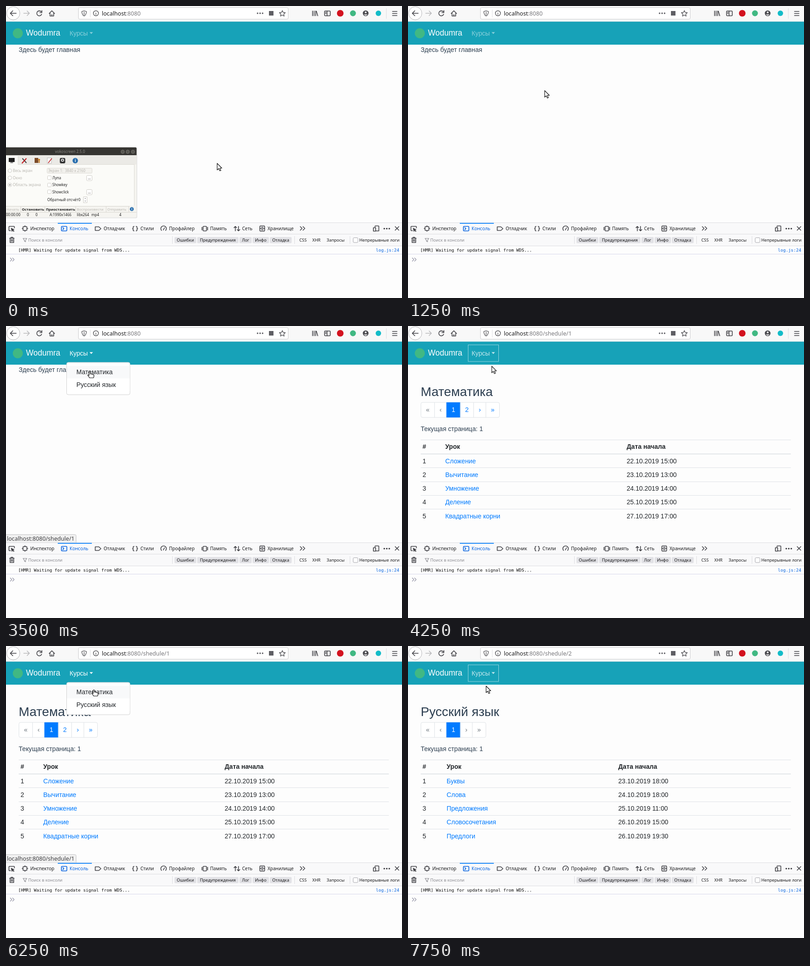
These frames come from a looping animation (872 px wide and 642 px high, 8 s). An HTML page:

```html
<!DOCTYPE html>
<html lang="ru">
<head>
<meta charset="utf-8">
<title>Курсы</title>
<style>
html, body { margin: 0; width: 100%; height: 100%; overflow: hidden; background: #fdfdfd; }
svg { display: block; }
text { white-space: pre; }
.ui { font-family: "Noto Sans", "Open Sans", sans-serif; }
.page { font: 14.16px "Liberation Sans", Arial, sans-serif; fill: #212529; }
.mono { font: 9.5px "DejaVu Sans Mono", monospace; }
.line { fill: none; stroke: #3f3f44; stroke-width: 1.6; stroke-linecap: round; stroke-linejoin: round; }
.thin { stroke-width: 1.2; }
.solid { fill: #3f3f44; stroke: none; }
.rule { stroke: #dcdce0; }
.mid { text-anchor: middle; }
.b { font-weight: bold; }
.dim { fill: #b9b7b1; }
.slate { fill: #2c3e50; }

/* 250 ms = 3.125% */
.t { animation: 8s step-end infinite; }
#recorder { animation-name: recorder; }
#home { animation-name: home; }
#math { animation-name: math; }
#rus { animation-name: rus; }
#menu { animation-name: menu; }
#row1 { animation-name: row1; }
#row2 { animation-name: row2; }
#label2 { animation-name: label2; }
#link { animation-name: link; }
#focus { animation-name: focus; }
#stRoot { animation-name: stRoot; }
#stOne { animation-name: stOne; }
#stTwo { animation-name: stTwo; }
#hand { animation-name: hand; }
#arrow { animation-name: arrow; }
#cursor { animation-name: move; }

@keyframes recorder { 0% { visibility: visible } 3.125%, to { visibility: hidden } }
@keyframes home { 0% { visibility: visible } 46.875%, to { visibility: hidden } }
@keyframes math { 0%, 87.5%, to { visibility: hidden } 46.875% { visibility: visible } }
@keyframes rus { 0% { visibility: hidden } 87.5%, to { visibility: visible } }
@keyframes menu { 0%, 46.875%, 87.5%, to { visibility: hidden } 28.125%, 71.875% { visibility: visible } }
@keyframes row1 { 0%, 46.875%, 81.25%, to { fill: #fff } 40.625%, 78.125% { fill: #f8f9fa } }
@keyframes row2 { 0%, 87.5%, to { fill: #fff } 81.25% { fill: #f8f9fa } 84.375% { fill: #007bff } }
@keyframes label2 { 0%, 87.5%, to { fill: #212529 } 84.375% { fill: #fff } }
@keyframes link {
  0% { fill-opacity: .5 }
  25%, 46.875%, 87.5%, to { fill-opacity: .75 }
  28.125%, 71.875% { fill-opacity: 1 }
}
@keyframes focus { 0%, 71.875% { visibility: hidden } 46.875%, 87.5%, to { visibility: visible } }
@keyframes stRoot { 0%, 40.625%, 78.125%, to { visibility: hidden } 28.125%, 71.875% { visibility: visible } }
@keyframes stOne { 0%, 46.875%, 81.25%, to { visibility: hidden } 40.625%, 78.125% { visibility: visible } }
@keyframes stTwo { 0%, 87.5%, to { visibility: hidden } 81.25% { visibility: visible } }
@keyframes hand { 0%, 46.875%, 87.5%, to { visibility: hidden } 25%, 62.5% { visibility: visible } }
@keyframes arrow { 0%, 46.875%, 87.5%, to { visibility: visible } 25%, 62.5% { visibility: hidden } }
@keyframes move {
  0% { transform: translate(465px, 346px); animation-timing-function: steps(5) }
  15.625% { transform: translate(301px, 186px); animation-timing-function: steps(3) }
  25%, 31.25% { transform: translate(161px, 64px); animation-timing-function: steps(4) }
  43.75%, 46.875% { transform: translate(185px, 100px); animation-timing-function: steps(7) }
  68.75%, 71.875% { transform: translate(183px, 59px); animation-timing-function: steps(4) }
  84.375% { transform: translate(205px, 133px); animation-timing-function: steps(4) }
  96.875%, to { transform: translate(172px, 88px) }
}
</style>
</head>
<body>
<svg width="872" height="642" viewBox="0 0 872 642">
  <rect width="872" height="642" fill="#fdfdfd"/>

  <!-- browser toolbar -->
  <g class="ui" font-size="12.6">
    <rect width="872" height="35" fill="#f8f8f8"/>
    <path class="rule" d="M0 34.5H872M837.5 5V28"/>
    <circle cx="16" cy="16" r="14.5" fill="#fff" stroke="#b4b4b6"/>
    <g class="line">
      <path d="M22.5 16H10M15 10.5L9.5 16L15 21.5"/>
      <path d="M39 16H51M46.5 11L51.5 16L46.5 21" stroke="#b9b9bb"/>
      <path d="M77.5 12.5A5.5 5.5 0 1 0 78.5 18M79 10V14.5H74.5"/>
      <path d="M95 16.5L101 10.5L107 16.5M97 16V22H105V16M101 22V18.5"/>
    </g>
    <rect x="159.5" y="3.5" width="462" height="25.5" rx="3" fill="#fff" stroke="#ccccce"/>
    <g class="line thin" stroke="#5f5f64">
      <path d="M172 10.5L177 12C177 17 175.5 20 172 22C168.5 20 167 17 167 12ZM172 13V19"/>
      <circle cx="198" cy="16" r="5.6"/>
      <path d="M198 15.5V19M198 13V13.1"/>
      <path d="M608.5 10L610.4 14.2L615 14.7L611.6 17.8L612.6 22.3L608.5 20L604.4 22.3L605.4 17.8L602 14.7L606.6 14.2Z"/>
    </g>
    <path class="rule" d="M185.5 8V25"/>
    <g fill="#5f5f64">
      <circle cx="554" cy="16" r="1.7"/><circle cx="559.5" cy="16" r="1.7"/><circle cx="565" cy="16" r="1.7"/>
      <rect x="579" y="11" width="10" height="10"/>
    </g>
    <text x="211" y="21" fill="#18181a">localhost<tspan fill="#77777b">:8080</tspan></text>
    <g class="line">
      <path d="M675 11V21.5M678.5 11V21.5M682 11V21.5M683.5 11.5L686.5 21.5"/>
      <rect x="701.5" y="11" width="12.5" height="10.5" rx="1.5"/>
      <path d="M707 11V21.5M703.5 14H705M703.5 16.5H705"/>
      <path d="M851 12H861M851 16.5H861M851 21H861"/>
    </g>
    <circle cx="736" cy="16" r="7.3" fill="#d3121f"/>
    <circle cx="764" cy="16" r="6.5" fill="#41b883"/>
    <circle cx="792" cy="16" r="6.3" fill="#4a4a4f"/>
    <circle cx="792" cy="14" r="2" fill="#f8f8f8"/><path d="M788 18.5H796Q794 21 792 21T788 18.5" fill="#f8f8f8"/>
    <circle cx="820" cy="16" r="6" fill="#12bcc8"/>
  </g>

  <!-- page -->
  <g class="page">
    <g id="home" class="t"><text class="slate" x="28" y="100.5">Здесь будет главная</text></g>
    <g id="math" class="t"></g>
    <g id="rus" class="t"></g>

    <rect y="34.4" width="872" height="50.6" fill="#17a2b8"/>
    <circle cx="26" cy="60" r="11" fill="#41b883"/>
    <text x="44" y="65.3" font-size="17.53" fill="#fff">Wodumra</text>
    <g id="link" class="t" fill="#fff"><text x="140" y="65">Курсы</text><path d="M184 57.5H191.5L187.75 61.5Z"/></g>
    <rect id="focus" class="t" x="132.5" y="41.5" width="67" height="36.5" fill="none" stroke="#fff" stroke-opacity=".55"/>

    <g id="menu" class="t">
      <rect x="133.5" y="80" width="139.5" height="71" rx="3.5" fill="#fff" stroke="#d2d2d2"/>
      <rect id="row1" class="t" x="134" y="87.5" width="138.5" height="27.8" fill="#fff"/>
      <rect id="row2" class="t" x="134" y="115.3" width="138.5" height="28" fill="#fff"/>
      <text x="155" y="106">Математика</text>
      <text id="label2" class="t" x="155" y="134">Русский язык</text>
    </g>
  </g>

  <!-- screen recorder -->
  <g id="recorder" class="t ui" font-size="8" fill="#1f1f1f">
    <rect x="-4" y="311" width="293" height="155.5" rx="3" fill="#000" opacity=".1"/>
    <rect x="-4" y="311" width="291.5" height="154" rx="3" fill="#f5f4f0"/>
    <path d="M0 310.7H285Q287.5 310.7 287.5 313.5V328H0Z" fill="#363532"/>
    <text class="mid" x="141" y="323" font-size="8.4" fill="#8d8b85">vokoscreen 2.5.0</text>
    <g fill="#55544f" stroke="#77756f"><circle cx="257" cy="320.5" r="3.8"/><circle cx="268" cy="320.5" r="3.8"/><circle cx="279.5" cy="320.5" r="3.8"/></g>
    <rect y="328" width="287.5" height="20.5" fill="#ebeae6"/>
    <path d="M0 330H26V349H282V439H0Z" fill="#fbfbf8"/>
    <path d="M26.5 330V348.5H282.5V439" fill="none" stroke="#dddbd5"/>
    <rect x="6" y="334" width="13" height="9" fill="#1d1d1d"/><rect x="9.5" y="343" width="6" height="2.5" fill="#888"/>
    <path d="M36 335L45 345" stroke="#444" stroke-width="2"/><path d="M45 335L35 346" stroke="#c4161c" stroke-width="2"/>
    <rect x="63" y="334" width="8" height="11" fill="#7b4b28"/><path d="M73 336V345M70 338H75" stroke="#c77f28" stroke-width="2.5"/>
    <rect x="91" y="334" width="9" height="12" fill="#fff" stroke="#bbb"/><path d="M101 335L93 345" stroke="#c23a3a" stroke-width="2"/>
    <rect x="118.5" y="334" width="12" height="12" rx="3" fill="#333"/><circle cx="124.5" cy="339" r="3.3" fill="#eee"/><circle cx="124.5" cy="339" r="1.5" fill="#222"/>
    <circle cx="152.5" cy="340" r="6" fill="#2a6fae"/><text class="mid b" x="152.5" y="343.2" font-size="9" fill="#fff">i</text>
    <g fill="#fff" stroke="#c8c6c0"><circle cx="8.5" cy="362" r="4"/><circle cx="8.5" cy="377.7" r="4"/><circle cx="8.5" cy="393.3" r="4"/></g>
    <circle cx="8.5" cy="393.3" r="1.8" fill="#aaa8a2"/>
    <g class="dim">
      <text x="15" y="365">Весь экран</text><text x="15" y="380.6">Окно</text><text x="15" y="396.2">Область экрана</text>
    </g>
    <rect x="90.5" y="356.5" width="99" height="11" rx="2" fill="#f3f2ee" stroke="#dcdad4"/>
    <text class="dim" x="93" y="365">Экран 1:  3840 x 2160</text>
    <g fill="#fff" stroke="#cfcdc7">
      <rect x="91.5" y="373.5" width="8" height="8" rx="1"/><rect x="91.5" y="389.5" width="8" height="8" rx="1"/><rect x="91.5" y="404.5" width="8" height="8" rx="1"/>
      <rect x="177.5" y="372.5" width="12" height="11.5" rx="2"/><rect x="177.5" y="403.5" width="12" height="11.5" rx="2"/>
      <path d="M170.5 419.5H178.5V432.5H170.5Z"/>
    </g>
    <text x="102" y="380.6">Лупа</text><text x="102" y="396.2">Showkey</text><text x="102" y="411.8">Showclick</text>
    <text class="mid" x="183.5" y="380.5">...</text><text class="mid" x="183.5" y="411.5">...</text>
    <text x="91" y="428.5">Обратный отсчёт</text><text x="159.5" y="428.5">0</text>
    <path d="M173 424L174.5 422L176 424ZM173 428L174.5 430L176 428Z" fill="#888"/>
    <path d="M0 440.5H272M0 453.5H287.5M32.5 441V453M85.5 441V453M153.5 441V453M220.5 441V453M270.5 441V453" stroke="#d9d7d1"/>
    <g font-size="7.85">
      <text class="dim" x="1" y="449.5">Начать</text><text class="b" x="35" y="449.5">Остановить</text><text class="b" x="88" y="449.5">Приостановить</text>
      <text class="dim" x="156" y="449.5">Воспроизвести</text><text class="dim" x="223" y="449.5">Отправить</text>
    </g>
    <circle cx="277" cy="446.5" r="4.3" fill="#2a6fae"/><text class="mid b" x="277" y="449" font-size="7" fill="#fff">i</text>
    <text x="0" y="462">00:00:00</text><text x="46" y="462">0</text><text x="65" y="462">0</text>
    <text x="96" y="462">A:1990x1466</text><text x="156" y="462">libx264</text><text x="188" y="462">mp4</text><text x="249.5" y="462">4</text>
  </g>

  <g class="ui" font-size="12.6" fill="#3f3f42">
    <g id="stRoot" class="t"></g>
    <g id="stOne" class="t"></g>
    <g id="stTwo" class="t"></g>
  </g>

  <!-- developer tools -->
  <g class="ui">
    <rect y="476" width="872" height="51" fill="#f9f9fa"/>
    <path class="rule" d="M0 476.5H872M0 501.5H872M0 527.5H872M366.5 506V523M635.5 506V523M757.5 506V523"/>
    <path d="M0 545.5H872" stroke="#d6d6ea"/>
    <rect x="114" y="476.9" width="75" height="1.8" fill="#0a84ff"/>
    <g id="tabs" font-size="10" fill="#18181a"></g>
    <g class="line">
      <path d="M10 494H7.5Q6.5 494 6.5 493V485.5Q6.5 484.5 7.5 484.5H17.5Q18.5 484.5 18.5 485.5V488"/>
      <path class="solid" d="M10.5 487.5L19 491.5L16 492.5L18.5 495L17 496.5L14.5 494L13 497Z"/>
      <rect x="37.5" y="485" width="8.5" height="8.5" rx="1"/><path d="M41.7 483V485M41.7 493.5V495.5M35.5 489.2H37.5M46 489.2H48"/>
      <g stroke="#0060df"><rect x="122" y="484.5" width="12" height="10" rx="1.5"/><path d="M125 487L127.5 489.5L125 492"/></g>
      <path d="M196.5 485.5H204.5L209 489.5L204.5 493.5H196.5Z"/>
      <path d="M282 484.5Q280 484.5 280 486.5V488Q280 489.5 278.5 489.5Q280 489.5 280 491V492.5Q280 494.5 282 494.5M286.5 484.5Q288.5 484.5 288.5 486.5V488Q288.5 489.5 290 489.5Q288.5 489.5 288.5 491V492.5Q288.5 494.5 286.5 494.5"/>
      <path d="M342.5 493.5A6 6 0 1 1 351.5 493.5M346.5 492.5L349 487.5"/>
      <rect x="434" y="484.5" width="7.5" height="10" rx="1"/><path d="M431.5 486.5V492.5M444 486.5V492.5"/>
      <path d="M505 494.5V484.5M502 487.5L505 484.5L508 487.5M512 484.5V494.5M509 491.5L512 494.5L515 491.5"/>
      <rect x="559" y="483.5" width="10.5" height="11.5" rx="1.5"/><path d="M559 489.2H569.5M562.5 486.5H566M562.5 492H566"/>
      <path d="M648 485L652 489L648 493M654 485L658 489L654 493"/>
      <path d="M812.5 486V484.5Q812.5 483.5 813.5 483.5H820Q821 483.5 821 484.5V494.5H814.5M809 487.5H814V495H809Z"/>
      <path d="M857 485L865 493M865 485L857 493"/>
      <path d="M8 510.5H18M11 510V508.5H15V510M9 511V520H17V511M11.7 513V517.5M14.3 513V517.5"/>
      <path class="thin" d="M37.5 511H46L43 515V518.5L40.5 517V515Z" stroke="#8a8a90"/>
      <path class="thin" d="M9.5 554L13 557.5L9.5 561M14.5 554L18 557.5L14.5 561" stroke="#9292a4"/>
    </g>
    <g class="solid"><circle cx="833" cy="489.5" r="1.7"/><circle cx="838.5" cy="489.5" r="1.7"/><circle cx="844" cy="489.5" r="1.7"/></g>
    <g font-size="9.25" fill="#18181a">
      <g id="chips"></g>
      <text x="49" y="518" fill="#8a8a90">Поиск в консоли</text>
      <text x="646" y="518">CSS</text><text x="674.5" y="518">XHR</text><text x="706" y="518">Запросы</text>
      <rect x="764.5" y="509.5" width="10.5" height="10.5" rx="2" fill="#fff" stroke="#a5a5ab"/>
      <text x="778" y="518">Непрерывные логи</text>
    </g>
    <g class="mono">
      <text x="27" y="540" fill="#0c0c0d">[HMR] Waiting for update signal from WDS...</text>
      <text x="866" y="540" text-anchor="end" fill="#0060df">log.js:24</text>
    </g>
  </g>

  <!-- pointer -->
  <g id="cursor" class="t" fill="#fff" stroke="#111" stroke-width="1.2" stroke-linejoin="round">
    <path id="arrow" class="t" d="M0 0V14.5L3.4 11.4L5.8 16.5L8.2 15.4L5.9 10.5H10.3Z"/>
    <path id="hand" class="t" d="M-2 1.5Q-.5 -1 1 1.5V5.5Q3 4.6 4 6Q6 5.3 6.6 7Q8.6 6.8 8.6 8.6V10.5Q8.6 12 7.5 14H-1Q-2 12 -4.5 9.2Q-5.5 7.2 -3.5 7.4L-2 8.5Z"/>
  </g>
</svg>
<script>
const fill = (id, html) => { document.getElementById(id).innerHTML = html; };
const text = (x, y, str, attrs = '') => `<text x="${x}" y="${y}" ${attrs}>${str}</text>`;
const rule = (y, w = 1) => `<path d="M28 ${y}H843" stroke="#dee2e6" stroke-width="${w}"/>`;

function pager(labels, edges, enabled) {
  const end = edges[edges.length - 1];
  let out = `<rect x="28.5" y="168" width="${end - 28.5}" height="33" rx="3.5" fill="#fff" stroke="#dee2e6"/>`;
  [...labels].forEach((label, i) => {
    const [a, b] = [edges[i], edges[i + 1]], current = label === '1';
    out += current
      ? `<rect x="${a - .5}" y="167.8" width="${b - a + .8}" height="33.3" fill="#007bff"/>`
      : i ? `<path d="M${a} 168V201" stroke="#dee2e6"/>` : '';
    const color = current ? '#fff' : i > 2 && enabled ? '#007bff' : '#6c757d';
    out += text((a + b) / 2, 189.3, label, `class="mid" fill="${color}"`);
  });
  return out;
}

function course(id, url, title, pages, lessonX, dateX, rows) {
  const head = (x, str) => text(x, 270.3, str, 'class="b"');
  fill(id,
    text(297, 21, url, 'class="ui" font-size="12.6" fill="#77777b"') +
    text(28, 153.5, title, 'class="slate" font-size="28.15"') + pages +
    text(28, 230.5, 'Текущая страница: 1', 'class="slate"') +
    rule(250.5) + head(32, '#') + head(lessonX, 'Урок') + head(dateX, 'Дата начала') + rule(281.3, 1.75) +
    rows.map(([lesson, date], i) => {
      const y = 301.7 + i * 30.2;
      return (i ? rule(Math.round(y - 20.5) + .5) : '') + text(32, y, i + 1) +
        text(lessonX, y, lesson, 'fill="#007bff"') + text(dateX, y, date.replace(' ', '.10.2019 '));
    }).join(''));
}

course('math', '/shedule/1', 'Математика', pager('«‹12›»', [28.5, 58.5, 85, 115, 144.5, 171.5, 201.5], true), 82, 481.5, [
  ['Сложение', '22 15:00'], ['Вычитание', '23 13:00'], ['Умножение', '24 14:00'],
  ['Деление', '25 15:00'], ['Квадратные корни', '27 17:00']]);
course('rus', '/shedule/2', 'Русский язык', pager('«‹1›»', [28.5, 58.5, 85, 115, 141.5, 171.5], false), 85, 463, [
  ['Буквы', '23 18:00'], ['Слова', '24 18:00'], ['Предложения', '25 11:00'],
  ['Словосочетания', '26 15:00'], ['Предлоги', '26 19:30']]);

const status = (id, path, w) => fill(id,
  `<path d="M0 458.5H${w - 3}Q${w} 458.5 ${w} 461.5V476.5H0" fill="#f0f0f0" stroke="#c4c4c6"/>` +
  text(2, 472.3, 'localhost:8080' + path));
status('stRoot', '/#', 105.5);
status('stOne', '/shedule/1', 154.5);
status('stTwo', '/shedule/2', 154.5);

fill('tabs', [[53.5, 'Инспектор'], [140, 'Консоль'], [215, 'Отладчик'], [296, 'Стили'], [359, 'Профайлер'],
  [449.5, 'Память'], [520, 'Сеть'], [576, 'Хранилище']]
  .map(([x, name]) => text(x, 493, name, name === 'Консоль' ? 'fill="#0060df"' : '')).join(''));

fill('chips', [[371, 48, 'Ошибки'], [421, 91, 'Предупреждения'], [514, 27, 'Лог'], [543, 36, 'Инфо'], [581, 48, 'Отладка']]
  .map(([x, w, name]) => `<rect x="${x}" y="508" width="${w}" height="13.5" rx="2" fill="#e2e2e6"/>` +
    text(x + w / 2, 518, name, 'class="mid"')).join(''));
</script>
</body>
</html>
```
